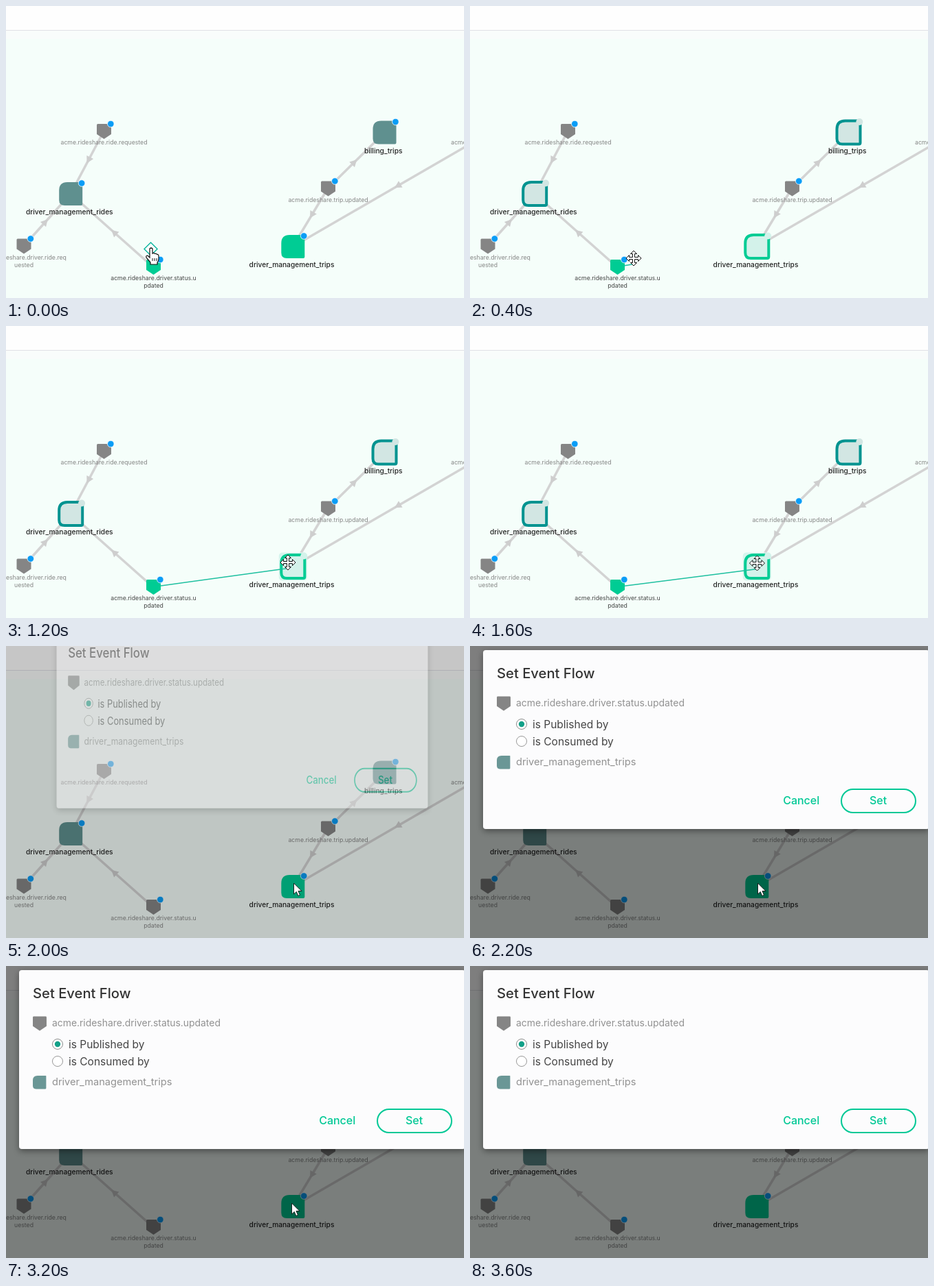
Write an HTML page that moves like this. It is 666 by 426 pixels and loops after 3800 ms.

```html
<!DOCTYPE html>
<html lang="en">
<head>
<meta charset="utf-8">
<title>Set Event Flow</title>
<style>
  html, body { margin: 0; width: 100%; height: 100%; overflow: hidden; background: #f5fefa; }
  svg { display: block; width: 666px; height: 426px; font-family: Inter, Roboto, sans-serif; }
  .event { font-size: 8.7px; fill: #858585; text-anchor: middle; }
  .event.selected { fill: #444; }
  .service { font-size: 10.2px; font-weight: 500; fill: #222; text-anchor: middle; }
  .dialog { filter: drop-shadow(0 3px 5px #0006); }
  .title { font-size: 20.2px; font-weight: 500; fill: #333; }
  .item { font-size: 13.9px; fill: #919191; }
  .item.large { font-size: 14.6px; }
  .option { font-size: 15.5px; fill: #444; }
  .button { font-size: 16px; font-weight: 500; fill: #00c895; text-anchor: middle; }
</style>
</head>
<body>
<svg id="stage" viewBox="0 0 666 426"></svg>
<script>
const LOOP = 3800, STEP = 200;
const GREEN = '#00cc94', TEAL = '#009390', SLATE = '#5f908f', GRAY = '#858585';

const services = [
  { x: 94.2, y: 274, name: 'driver_management_rides', labelX: 92.3 },
  { x: 550.5, y: 184.5, name: 'billing_trips', labelX: 548.7 },
  { x: 417.3, y: 351, name: 'driver_management_trips', labelX: 415.5, active: true },
];
const events = [
  { x: 142.5, y: 172, lines: ['acme.rideshare.ride.requested'] },
  { x: 26, y: 339.5, lines: ['acme.rideshare.driver.ride.req', 'uested'] },
  { x: 468.5, y: 255.5, lines: ['acme.rideshare.trip.updated'] },
  { x: 214.5, y: 370, lines: ['acme.rideshare.driver.status.u', 'pdated'], active: true },
];
const edges = [
  [142, 183, 94, 274], [26, 350, 94, 274], [214, 381, 94, 274],
  [468, 266, 551, 184], [468, 266, 417, 351], [715, 178, 417, 351],
];
// Pointer positions while dragging, one per step from 400 ms on
const dragPath = [[238, 368], [312, 352], [386, 341], [402, 343], [410, 345], [415, 346], [417.5, 346]];

const clamp = v => Math.max(0, Math.min(1, v));
const text = (x, y, cls, str) => `<text x="${x}" y="${y}" class="${cls}">${str}</text>`;
const rect = (x, y, w, h, attrs) => `<rect x="${x}" y="${y}" width="${w}" height="${h}" ${attrs}/>`;
const circle = (x, y, r, attrs) => `<circle cx="${x}" cy="${y}" r="${r}" ${attrs}/>`;
const path = (x, y, d, attrs, scale = 1) =>
  `<path transform="translate(${x} ${y}) scale(${scale})" d="${d}" ${attrs}/>`;
const dot = (x, y) => circle(x, y, 4.8, 'fill="#0a9df6" stroke="#fff" stroke-width=".8"');

const leaf = 'M-5-17H16Q17-17 17-16V15Q17 17 15 17H-9Q-17 17-17 9V-5Q-17-17-5-17Z';
const shield = 'M-9 0H9Q10.5 0 10.5 1.5V15L0 22L-10.5 15V1.5Q-10.5 0-9 0Z';

function edge([x1, y1, x2, y2]) {
  const angle = Math.atan2(y2 - y1, x2 - x1) * 180 / Math.PI;
  return `<path d="M${x1} ${y1}L${x2} ${y2}" stroke="#d3d3d3" stroke-width="3.5"/>
    <path d="M1 0L-9-5.5V5.5Z" fill="#cecece"
      transform="translate(${(x1 + x2) / 2} ${(y1 + y2) / 2}) rotate(${angle})"/>`;
}

function service({ x, y, name, labelX, active }, dragging, hovered) {
  const label = text(labelX, y + 30, 'service', name);
  const dotX = x + 15.9, dotY = y - 15.5;
  if (!dragging) return path(x, y, leaf, `fill="${active ? GREEN : SLATE}"`) + dot(dotX, dotY) + label;
  const halo = hovered && active ? rect(x - 20.5, y - 20.5, 41, 41, 'rx="5" fill="#d6f5ed"') : '';
  const tint = active ? '#d3f2ea' : '#d2e6e3';
  return halo
    + path(x, y, leaf, `fill="${tint}" stroke="${active ? GREEN : TEAL}" stroke-width="4"`)
    + circle(dotX, dotY, 5, `fill="${tint}"`) + label;
}

function event({ x, y, lines, active }, selected) {
  const lit = active && selected;
  return path(x, y, shield, `fill="${lit ? GREEN : GRAY}"`) + dot(x + 9.8, y)
    + lines.map((line, i) => text(x, y + 30.2 + i * 10.8, lit ? 'event selected' : 'event', line)).join('');
}

const moveCursor = (x, y) => path(x, y,
  'M0-11L4.5-6.5H1.5V-1.5H6.5V-4.5L11 0L6.5 4.5V1.5H1.5V6.5H4.5L0 11' +
  'L-4.5 6.5H-1.5V1.5H-6.5V4.5L-11 0L-6.5-4.5V-1.5H-1.5V-6.5H-4.5Z',
  'fill="#fff" stroke="#111"');

const arrowCursor = (x, y) => path(x, y, 'M0 0V16L3.8 12.5L6.3 18.5L9 17.3L6.5 11.5H11.5Z',
  'fill="#fff" stroke="#111" stroke-width=".9"');

const handCursor = (x, y) => path(x, y,
  'M-2 1Q0-1 2 1V8Q4 6.5 5.5 8.5Q7.5 7.5 8.5 9.5Q11 9 11 12V16Q11 19 9 21V24H-1V21' +
  'L-7 14Q-8 11-5 11L-2 14Z', 'fill="#fff" stroke="#111" stroke-width="1.2"')
  + path(x, y, 'M2 15V19M5 15V19M8 15V19', 'stroke="#111"');

function dialog(p) {
  const cx = 343.5;
  const scale = 0.7 + 0.3 * p;
  return rect(0, 0, 666, 426, `opacity="${0.5 * p}"`)
    + `<g class="dialog" opacity="${p}"
        transform="translate(${cx} ${-54 * (1 - p)}) scale(${scale} 1) translate(${-cx} 0)">`
    + rect(19, 6, 649, 261, 'rx="4" fill="#fcfcfd"')
    + text(39, 47, 'title', 'Set Event Flow')
    + path(49, 73.5, shield, `fill="${GRAY}"`, 0.95)
    + text(67, 88, 'item', 'acme.rideshare.driver.status.updated')
    + circle(75, 114, 7.5, 'fill="#fff" stroke="#8d8d8d"') + circle(75, 114, 4.2, 'fill="#12a088"')
    + text(91, 120, 'option', 'is Published by')
    + circle(75, 139, 7.5, 'fill="#fff" stroke="#999"')
    + text(91, 145, 'option', 'is Consumed by')
    + path(48.7, 169.7, leaf, 'fill="#6a9796"', 0.57)
    + text(67, 174, 'item large', 'driver_management_trips')
    + text(481.7, 231, 'button', 'Cancel')
    + rect(540, 209, 108, 34, 'rx="17" fill="none" stroke="#00c895" stroke-width="2"')
    + text(593.5, 231, 'button', 'Set')
    + '</g>';
}

function dragPoint(t) {
  return dragPath[Math.min(dragPath.length - 1, (t - 400) / STEP)];
}

function pointer(t) {
  if (t < 400) {
    return path(210.5, 354.5, 'M0-9.5L9.5 0L0 9.5L-9.5 0Z', 'fill="#fff" stroke="#10b8a0" stroke-width="1.5"')
      + handCursor(211, 353);
  }
  if (t < 2000) return moveCursor(...dragPoint(t));
  if (t < 3200) return arrowCursor(418.5, 346);
  if (t < 3400) return arrowCursor(415.5, 346);
  return t < 3600 ? arrowCursor(293, 340) : '';
}

function scene(t) {
  const dragging = t >= 400 && t < 2000;
  const dialogProgress = clamp((t - 1912) / 200);
  let dragLine = '';
  if (dragging) {
    const [x, y] = dragPoint(t);
    dragLine = `<path d="M214.5 380.5L${x} ${y + 8.5}" stroke="#1dbf9f" stroke-width="1.5"/>`;
  }
  return rect(0, 0, 666, 426, 'fill="#f5fefa"')
    + rect(0, 36, 666, 12, 'fill="#f9fcfb"')
    + rect(0, 0, 666, 35, 'fill="#fefefe"')
    + rect(0, 35, 666, 1, 'fill="#e0e1e6"')
    + edges.map(edge).join('')
    + services.map(s => service(s, dragging, t >= 800)).join('')
    + dragLine
    + events.map(e => event(e, t < 2000)).join('')
    + `<text x="647" y="202" class="event" style="text-anchor:start">acme.rideshare</text>`
    + (dialogProgress ? dialog(dialogProgress) : '')
    + pointer(t);
}

const stage = document.getElementById('stage');
const start = performance.now();
let shown = -1;

function frame() {
  // The scene advances in fixed steps, so poses hold between them
  const t = Math.floor((performance.now() - start) % LOOP / STEP) * STEP;
  if (t !== shown) stage.innerHTML = scene(shown = t);
  requestAnimationFrame(frame);
}
frame();
</script>
</body>
</html>
```
